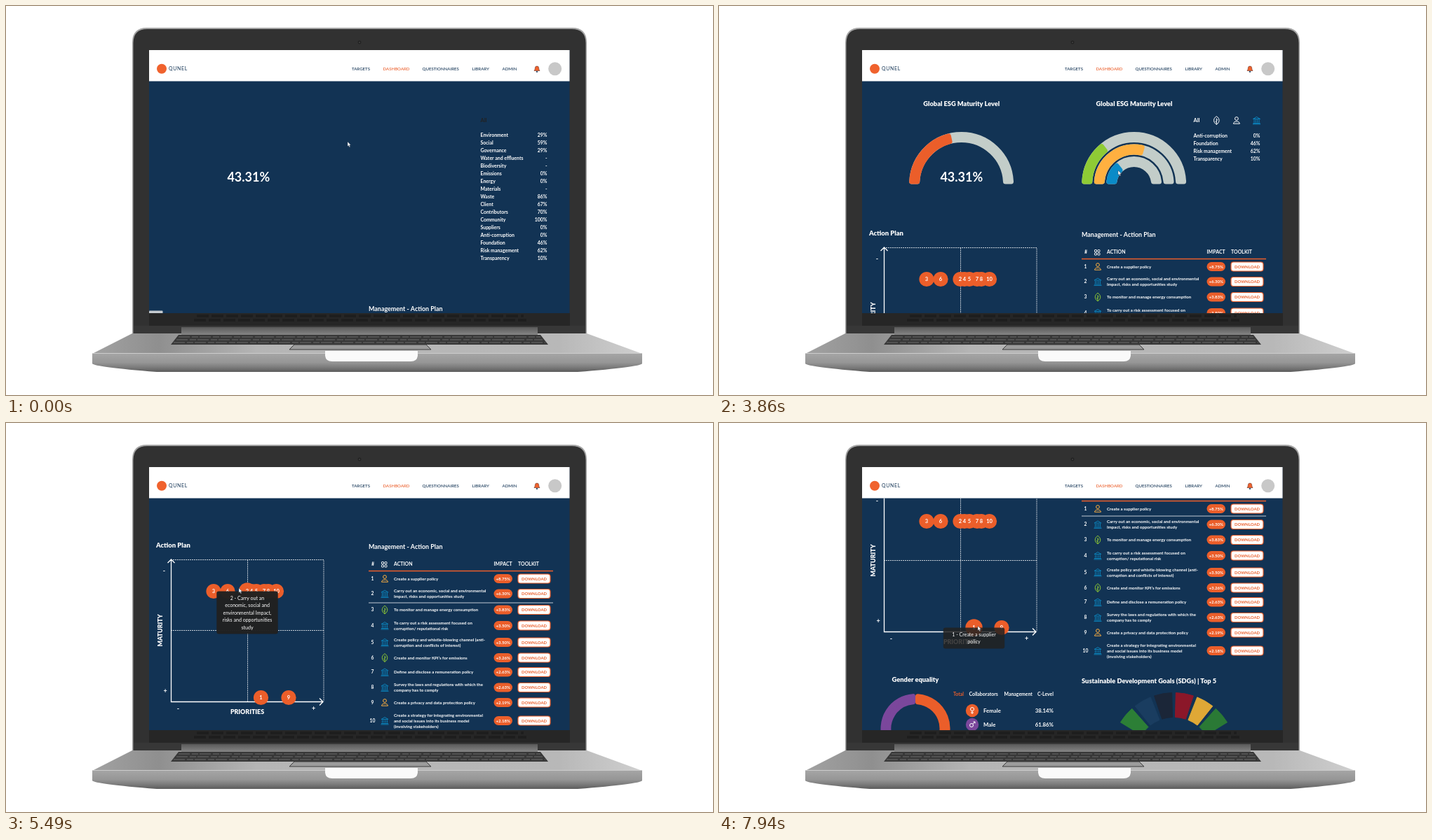
An HTML page for the animation above (8 s loop, 1008 by 556 pixels).

```html
<!DOCTYPE html>
<html lang="en">
<head>
<meta charset="utf-8">
<title>ESG dashboard</title>
<style>
html, body { margin: 0; width: 100%; height: 100%; overflow: hidden; background: #fff; }
svg { display: block; width: 1008px; height: 556px; }
text { font-family: Lato, "Open Sans", sans-serif; font-weight: 700; white-space: pre; }
.regular { font-weight: 400; }
.medium { font-weight: 500; }
.heavy { font-weight: 900; }
</style>
</head>
<body>
<svg viewBox="0 0 1008 556">
  <defs>
    <clipPath id="view"><rect x="204" y="107.5" width="599.5" height="331.5"/></clipPath>
    <linearGradient id="deck"><stop stop-color="#a2a2a2"/><stop offset=".12" stop-color="#8f8f8f"/><stop offset=".3" stop-color="#b5b5b5"/><stop offset=".85" stop-color="#b8b8b8"/><stop offset="1" stop-color="#cfcfcf"/></linearGradient>
    <linearGradient id="front" x2="0" y2="1"><stop stop-color="#a6a6a6"/><stop offset=".5" stop-color="#969696"/><stop offset=".75" stop-color="#7c7c7c"/><stop offset="1" stop-color="#5c5c5c"/></linearGradient>
    <linearGradient id="hinge" x2="0" y2="1"><stop stop-color="#5a5a5a"/><stop offset="1" stop-color="#858585"/></linearGradient>
  </defs>

  <!-- laptop -->
  <path d="M180 470V52Q180 31 201 31H807Q828 31 828 52V470Z" fill="#a4a4a4"/>
  <path d="M181.500 468V53Q181.500 33 201.500 33H806.500Q826.500 33 826.500 53V468Z" fill="#313131"/>
  <circle cx="504" cy="52" r="2.4" fill="#222"/><circle cx="504" cy="52" r="1" fill="#444"/>
  <path d="M204 439H804V457H204Z" fill="#262626"/>
  <path d="M272 443H738M268 449H742" stroke="#1e1e1e" stroke-width="4" stroke-dasharray="17 4"/>
  <path d="M182 457H826V469H182Z" fill="#373737"/>
  <path d="M180 468H828L907 497H123Z" fill="url(#deck)"/>
  <path d="M250 459H758V470H250Z" fill="url(#hinge)"/>
  <path d="M246 470H762L773 484H235Z" fill="#383838"/>
  <path d="M246 473H762M243 477H765M239 481H769" stroke="#777" stroke-width=".8" stroke-dasharray="16 3 9 2"/>
  <path d="M411 484H599L606 491H404Z" fill="#9c9c9c" stroke="#3d3d3d"/>
  <path d="M123 496H907V511Q904 516 815 523H215Q126 516 123 511Z" fill="url(#front)"/>
  <path d="M123 496.500H907" stroke="#ccc"/>
  <path d="M455 493H587V500Q586 508 577 508H465Q456 508 455 500Z" fill="#fafafa"/>

  <!-- screen -->
  <path d="M204 63H803.500V439H204Z" fill="#123354"/>
  <path d="M204 63H803.500V107.500H204Z" fill="#fff"/>
  <circle cx="222" cy="89.700" r="7" fill="#f0622d"/>
  <g id="nav"></g>
  <path d="M753 92.500Q754.400 91 754.400 88.500Q754.400 86 757 86Q759.600 86 759.600 88.500Q759.600 91 761 92.500Z" fill="#f0622d" stroke="#7a3c2a" stroke-width=".7"/>
  <circle cx="757" cy="94" r="1.1" fill="#123354"/>
  <circle cx="782.700" cy="89.800" r="9.500" fill="#c8c8c8"/>
  <g id="page" clip-path="url(#view)"></g>
  <g id="cursor"></g>
</svg>
<script>
const ORANGE = '#eb5e2a', GREEN = '#8fcb35', YELLOW = '#ffb040', BLUE = '#0a8bc8', GREY = '#c3cdc9', NAVY = '#123354', PURPLE = '#7b479c';
const LOOP = 8000, STEP = 203.6;
const MID = 'text-anchor="middle"', END = 'text-anchor="end"', HEAVY = 'class="heavy"';

const topics = [
  ['Environment', '29%'], ['Social', '59%'], ['Governance', '29%'],
  ['Water and effluents', '-'], ['Biodiversity', '-'], ['Emissions', '0%'], ['Energy', '0%'], ['Materials', '-'], ['Waste', '86%'],
  ['Client', '67%'], ['Contributors', '70%'], ['Community', '100%'], ['Suppliers', '0%'],
  ['Anti-corruption', '0%'], ['Foundation', '46%'], ['Risk management', '62%'], ['Transparency', '10%']
];
const filters = { all: [0, 17], leaf: [3, 9], person: [9, 13], bank: [13, 17] };
const tint = { leaf: GREEN, person: YELLOW, bank: BLUE };

// y, icon, impact, text
const actions = [
  [222.5, 'person', 8.75, 'Create a supplier policy'],
  [244, 'bank', 6.3, 'Carry out an economic, social and environmental|Impact, risks and opportunities study'],
  [266, 'leaf', 3.83, 'To monitor and manage energy consumption'],
  [288.5, 'bank', 3.5, 'To carry out a risk assessment focused on|corruption/ reputational risk'],
  [312.5, 'bank', 3.5, 'Create policy and whistle-blowing channel (anti-|corruption and conflicts of interest)'],
  [334.5, 'leaf', 3.26, 'Create and monitor KPI’s for emissions'],
  [355, 'bank', 2.63, 'Define and disclose a remuneration policy'],
  [377, 'bank', 2.63, 'Survey the laws and regulations with which the|company has to comply'],
  [398.5, 'person', 2.19, 'Create a privacy and data protection policy'],
  [424.5, 'bank', 2.18, 'Create a strategy for integrating environmental|and social issues into its business model|(involving stakeholders)']
];
// number, x, y
const bubbles = [[3, 296, 240.5], [6, 316, 240.5], [2, 344, 240.5], [4, 350, 240.5], [5, 357, 240.5],
  [7, 368, 240.5], [8, 374, 240.5], [10, 385.5, 240.5], [1, 363.5, 392.5], [9, 403, 392.5]];

// step, x, y
const cursorPath = [[0, 487, 194], [4, 709, 160], [10, 709, 161], [12, 741, 160], [14, 741, 160], [15, 766, 160], [17, 766, 160], [18, 594, 222],
  [19, 569, 235], [23, 412, 229], [24, 390, 236], [25, 372, 238], [27, 332, 236], [28, 316, 238], [29, 298, 238], [30, 306, 256],
  [33, 331, 259], [36, 380, 262], [38, 372, 278], [39, 369, 290]];
const scrollPath = [[0, 0], [20, 0], [23, 150], [33, 150], [36, 250], [39, 250]];

const clamp = v => Math.max(0, Math.min(1, v));
const easeOut = v => 1 - (1 - clamp(v)) ** 3;

function along(path, step) {
  let i = 1;
  while (i < path.length - 1 && path[i][0] < step) i++;
  const a = path[i - 1], b = path[i], f = clamp((step - a[0]) / (b[0] - a[0]));
  return a.slice(1).map((v, n) => v + (b[n + 1] - v) * f);
}

const text = (x, y, s, size, extra = '', fill = '#fff') =>
  `<text x="${x}" y="${y + size * .35}" font-size="${size}" fill="${fill}" ${extra}>${s}</text>`;
const rect = (x, y, w, h, r, fill, extra = '') =>
  `<rect x="${x}" y="${y}" width="${w}" height="${h}" rx="${r}" fill="${fill}" ${extra}/>`;
const circle = (x, y, r, fill) => `<circle cx="${x}" cy="${y}" r="${r}" fill="${fill}"/>`;
const line = (d, width = 1, extra = '', color = '#fff') =>
  `<path d="${d}" fill="none" stroke="${color}" stroke-width="${width}" ${extra}/>`;
const shift = (y, content) => `<g transform="translate(0 ${y})">${content}</g>`;

const glyphs = {
  leaf: 'M0-5.800C5-2.800 5 2.800 0 5.800C-5 2.800-5-2.800 0-5.800ZM0-3V6M0 .5L1.800-1.300M0 3L-1.800 1.200',
  person: 'M-2.400-2.500a2.400 2.400 0 1 0 4.800 0a2.400 2.400 0 1 0-4.800 0M-4.500 4.700C-4.500 .5 4.500 .5 4.500 4.700Z',
  bank: 'M-5-2L0-5L5-2ZM-3.500-1V3M-1.200-1V3M1.200-1V3M3.500-1V3M-5 4H5M-5.500 5.400H5.500',
  female: 'M-2.500-2a2.500 2.500 0 1 0 5 0a2.500 2.500 0 1 0-5 0M0 .5V5M-2 3H2',
  male: 'M-3.500 1a2.500 2.500 0 1 0 5 0a2.500 2.500 0 1 0-5 0M1-1L4-4M1.500-4H4V-1.500'
};
const icon = (kind, x, y, color = '#fff') =>
  line(glyphs[kind], 1, `transform="translate(${x} ${y})"`, color);

// ring segment with rounded corners: inset by c, then outlined with round joins
function sector(cx, cy, r1, r2, a0, a1, color, c = 3.5) {
  const inner = r1 + c, outer = r2 - c;
  const at = (r, a, side) => {
    const q = a * Math.PI / 180 + side * c / r;
    return `${(cx + r * Math.cos(q)).toFixed(2)} ${(cy + r * Math.sin(q)).toFixed(2)}`;
  };
  if ((a1 - a0) * Math.PI / 180 * inner <= 2 * c) return '';
  const big = a1 - a0 > 180 ? 1 : 0;
  return `<path d="M${at(outer, a0, 1)}A${outer} ${outer} 0 ${big} 1 ${at(outer, a1, -1)}L${at(inner, a1, -1)}A${inner} ${inner} 0 ${big} 0 ${at(inner, a0, 1)}Z"
    fill="${color}" stroke="${color}" stroke-width="${2 * c}" stroke-linejoin="round"/>`;
}
const gauge = (cx, r, share, color, grow) =>
  sector(cx, 254.5, r - 15, r, 180, 180 + 180 * grow, GREY) +
  sector(cx, 254.5, r - 15, r, 180, 180 + 180 * share * grow, color);

function maturity(step) {
  const selected = step < 5 ? 'all' : step < 13 ? 'leaf' : step < 16 ? 'person' : 'bank';
  let out = text(345.8, 244.5, '43.31%', 18, MID);
  if (step > 0) {
    const grow = easeOut(step / 4);
    for (const x of [345.8, 592]) out += text(x, 139.5, 'Global ESG Maturity Level', 9.25, `${MID} ${HEAVY}`);
    out += gauge(345.6, 74.5, .4331, ORANGE, grow) + gauge(591.7, 74.5, .29, GREEN, grow) +
      gauge(591.7, 57, .59, YELLOW, grow) + gauge(591.7, 39.5, .29, BLUE, grow);
    Object.keys(tint).forEach((kind, i) => out += icon(kind, 709.3 + 28.6 * i, 163.5, kind === selected ? tint[kind] : '#fff'));
  }
  out += text(676.5, 163.5, 'All', 7.5, '', selected === 'all' ? '#222' : '#fff');
  topics.slice(...filters[selected]).forEach(([name, value], i) => {
    const y = (step ? 185.5 : 184.5) + 11 * i;
    out += text(676.5, y, name, 6.95) + text(771.5, y, value, 6.95, END);
  });
  return out;
}

function matrix(hovered) {
  let out = text(214, 174.5, 'Action Plan', 9.4, HEAVY);
  out += line('M235 195.500H453V398M344.500 195.500V398M235 296.500H453', 1, 'stroke-dasharray="2 1"', '#c8d0d8');
  out += line('M235.500 195V398.500H452M230.500 200L235.500 195L240.500 200M447 393.500L452 398.500L447 403.500', 1.3);
  for (const [x, y, s] of [[225.5, 211, '-'], [227, 383, '+'], [245.5, 408, '-'], [438.5, 408, '+']]) out += text(x, y, s, 9, MID);
  out += text(344, 413, 'PRIORITIES', 8.9, `${MID} ${HEAVY}`);
  out += `<g transform="translate(220 296.500) rotate(-90)">${text(0, 0, 'MATURITY', 8.9, `${MID} ${HEAVY}`)}</g>`;
  bubbles.forEach(([n, x, y]) => out += circle(x, y, n === hovered ? 12.2 : 10.6, ORANGE));
  bubbles.forEach(([n, x, y]) => out += text(x, y, n, 7.5, MID));
  return out;
}

function table(hovered) {
  let out = text(517, 176.5, 'Management - Action Plan', 8.95);
  out += text(523, 202, '#', 7, MID) + text(553, 202, 'ACTION', 7) + text(695.5, 202, 'IMPACT', 7) + text(730, 202, 'TOOLKIT', 7);
  for (const x of [535.5, 540]) for (const y of [198.5, 203]) out += rect(x, y, 3, 3, .5, 'none', 'stroke="#fff" stroke-width=".9"');
  out += line('M517 211.500H780', 1.3, '', ORANGE);
  actions.forEach(([top, kind, impact, label], i) => {
    const n = i + 1, lines = label.split('|'), y = top + (hovered && n > hovered ? 1 : 0);
    out += text(522.5, y, n, 6.8, MID) + icon(kind, 540, y, kind === 'bank' ? '#0b7fb6' : tint[kind]);
    lines.forEach((s, j) => out += text(553, y + 8 * (j - (lines.length - 1) / 2), s, 6.1));
    out += rect(695.5, y - 6.5, 26.5, 13, 6.5, ORANGE) + text(708.7, y, `+${impact.toFixed(2)}%`, 6.1, MID);
    out += rect(730, y - 6.5, 46, 13, 3.5, '#fff', `stroke="${ORANGE}" stroke-width="1.2"`) + text(753, y, 'DOWNLOAD', 5.9, MID, ORANGE);
    if (n === hovered) out += line(`M517 ${y + [10.5, 13, 15][lines.length - 1]}H780`, .9, '', '#d5dbe1');
  });
  return out;
}

function equality(step) {
  const start = -90, grow = easeOut((step - 36) / 2.5), split = start + 137.3 * grow;
  let out = text(280, 466.5, 'Gender equality', 9.3, `${MID} ${HEAVY}`);
  out += sector(280, 536.5, 34.5, 49.5, split, start + 360 * grow, PURPLE) + sector(280, 536.5, 34.5, 49.5, start, split, ORANGE);
  out += text(334, 488, 'Total', 6.9, '', ORANGE) + text(356.5, 488, 'Collaborators', 6.9) +
    text(406.5, 488, 'Management', 6.9) + text(477, 488, 'C-Level', 6.9, END);
  [['Female', '38.14%', ORANGE], ['Male', '61.86%', PURPLE]].forEach(([name, value, color], i) => {
    const y = 511 + 20 * i;
    out += circle(361, y, 9.2, color) + icon(name.toLowerCase(), 361, y) + text(377, y, name, 7.8) + text(477, y, value, 7.8, END);
  });
  out += text(517, 468.5, 'Sustainable Development Goals (SDGs) | Top 5', 9.3, HEAVY);
  ['#2c7f36', '#1a3d60', '#1b2638', '#8b1729', '#dfa836', '#2a7935'].forEach((color, i) =>
    out += sector(648.5, 575, 54, 90, -148.5 + 20 * i, -131.5 + 20 * i, color, .5));
  return out;
}

function wrap(s, limit) {
  return s.split(' ').reduce((lines, word) => {
    const last = lines[lines.length - 1];
    if (last && (last + ' ' + word).length <= limit) lines[lines.length - 1] += ' ' + word;
    else lines.push(word);
    return lines;
  }, []);
}

function tooltip(hovered, opacity) {
  if (!hovered) return '';
  const [, x, y] = bubbles.find(b => b[0] === hovered);
  const lines = wrap(`${hovered} - ${actions[hovered - 1][3].replace('|', ' ')}`, 23);
  return rect(x - 43.7, y, 87.4, 9.5 + 10.3 * lines.length, 3, '#212121', `opacity="${opacity}"`) +
    lines.map((s, i) => text(x, y + 10 + 10.4 * i, s, 7.05, `${MID} class="regular"`)).join('');
}

function hoveredAt(step) {
  if (step < 23) return 0;
  const [x, y] = along(cursorPath, step), top = 150 - along(scrollPath, step)[0];
  const near = bubbles.map(b => [Math.hypot(b[1] - x, b[2] + top - y), b[0]]).sort((a, b) => a[0] - b[0])[0];
  return near[0] < 13 ? near[1] : 0;
}

function pointer(step) {
  const [x, y] = along(cursorPath, step);
  const hand = y < 165 && x > 700;
  const d = hand ? 'M-1 0Q0-1 1 0V3L4 4Q5 4.500 4.500 6L3.700 8.500H-.5L-3 5Q-2.500 4-1 5Z' : 'M0 0V6.600L1.500 5.300L2.600 7.700L3.700 7.200L2.700 4.800H4.700Z';
  return `<path d="${d}" transform="translate(${x} ${y})" fill="#fff" stroke="#26364a" stroke-width=".4"/>`;
}

function render(step) {
  const scroll = along(scrollPath, step)[0], hovered = hoveredAt(step);
  const lower = 150 - scroll + (step < 5 ? 106 : 0);
  page.innerHTML = shift(-scroll, maturity(step)) +
    shift(lower, (step ? matrix(hovered) : '') + table(hovered) + equality(step) +
      tooltip(hovered, hoveredAt(step - 1) ? .97 : .85)) +
    (step ? '' : rect(204, 435.5, 19.5, 4, 1, '#c5cbd0'));
  cursor.innerHTML = pointer(step);
}

const page = document.getElementById('page'), cursor = document.getElementById('cursor');
document.getElementById('nav').innerHTML =
  text(232, 89.8, 'QUNEL', 6.8, 'letter-spacing=".8" class="regular"', NAVY) +
  [[493, 'TARGETS'], [537.5, 'DASHBOARD'], [593.5, 'QUESTIONNAIRES'], [664.5, 'LIBRARY'], [707.5, 'ADMIN']]
    .map(([x, s]) => text(x, 90, s, 6.1, 'class="medium"', s === 'DASHBOARD' ? ORANGE : NAVY)).join('');

let shown = -1;
function tick() {
  const step = Math.min(39, Math.floor((performance.now() % LOOP + 16) / STEP));
  if (step !== shown) render(shown = step);
  requestAnimationFrame(tick);
}
tick();
</script>
</body>
</html>
```
